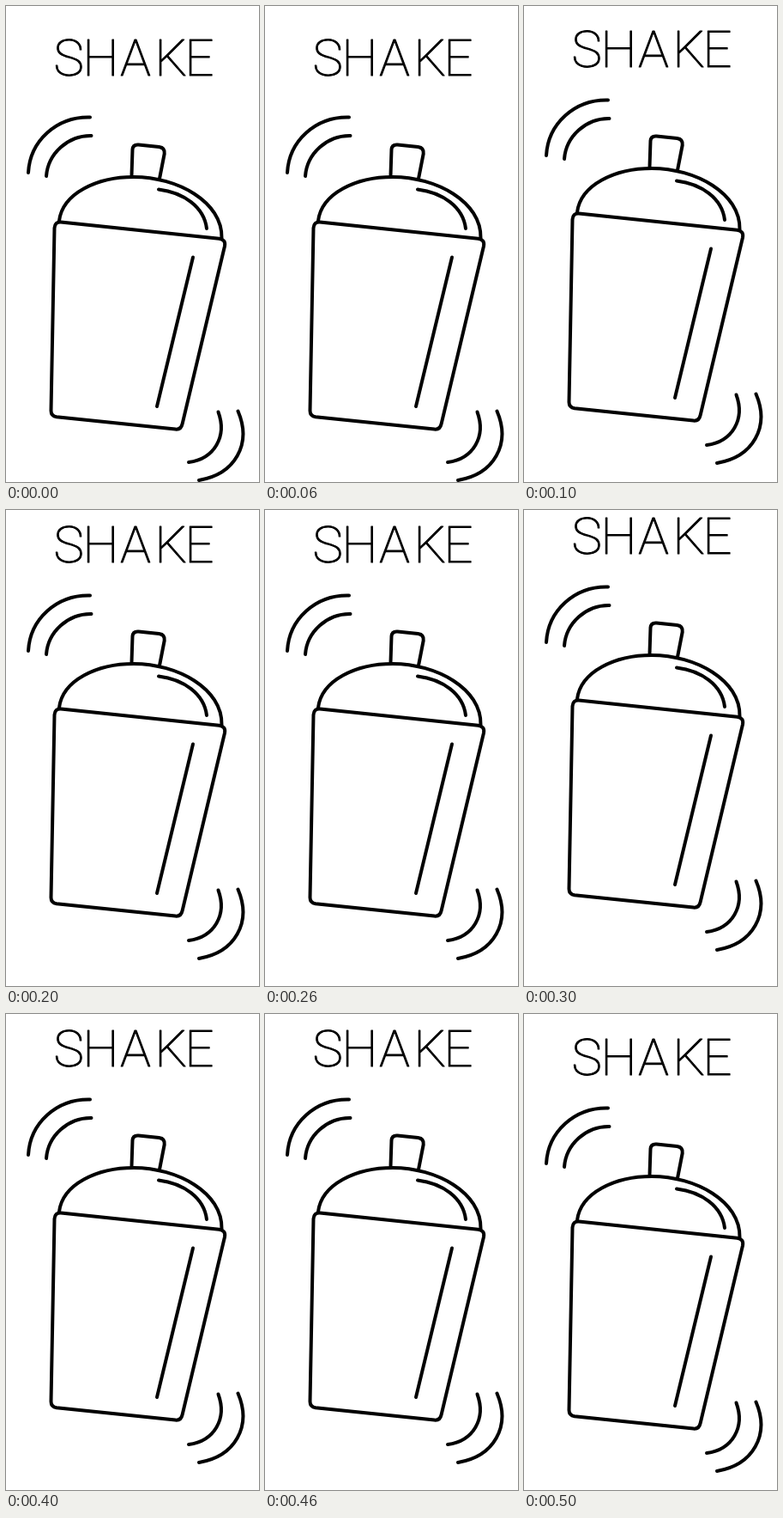
Write an HTML page that moves like this. It is 295x554 px and loops after 600 ms.

```html
<!DOCTYPE html>
<html lang="en">
<head>
<meta charset="utf-8">
<title>Shake</title>
<style>
  html, body { margin: 0; width: 100%; height: 100%; overflow: hidden; background: #fff; }
  svg { display: block; width: 100%; height: 100%; }
  path { fill: none; stroke: #000; stroke-width: 4; stroke-linecap: round; stroke-linejoin: round; }
  text {
    font: 100 59.5px Roboto, Lato, Inter, sans-serif;
    text-anchor: middle;
    stroke: #000;
    stroke-width: 1.1;
    stroke-linejoin: round;
  }
</style>
</head>
<body>
<svg viewBox="0 0 295 554">
  <g id="shaker">
    <text x="73 110.5 151 192.5 225.5" y="80.8">SHAKE</text>
    <path d="M146.5 197 L147.5 167 Q148 161 154.5 161.5 L178.5 164 Q185.500 165 184.700 172 L179 201"/>
    <path d="M62 250 C66 218 106 199 149 199 C200 199 252.500 228 251.500 270"/>
    <path d="M64 251.500 L248.500 270.700 Q256.500 272 255 279.500 L205.700 486 Q204.200 493.300 197.500 492.600 L59 478.300 Q52.500 477.300 52.500 471 L56.500 258.500 Q57 251 64 251.500Z"/>
    <path d="M178 213.500 C207 217 231 234 234 259"/>
    <path d="M218 292.500 L176 466"/>
  </g>
  <g id="waves">
    <path d="M98 129.500 C59 128.500 28 157 26 194"/>
    <path d="M99.500 151 C72 150.500 49 172 47 198"/>
    <path d="M247.500 472.500 C258 501 243 527 213 531"/>
    <path d="M270.500 471.500 C287 510 267 545 225 552"/>
  </g>
</svg>
<script>
  const LOOP = 600;

  // Each height is held for an equal share of the loop.
  function bounce(id, heights) {
    const frames = [...heights, heights[0]].map((y, i) => ({
      transform: `translateY(${-y}px)`,
      offset: i / heights.length,
      easing: 'step-end'
    }));
    const anim = document.getElementById(id).animate(frames, { duration: LOOP, iterations: Infinity });
    anim.startTime = 0;
  }

  bounce('shaker', [0, 10, 20, 30, 20, 10]);
  bounce('waves', [0, 20, 30, 40, 30, 20]);
</script>
</body>
</html>
```
